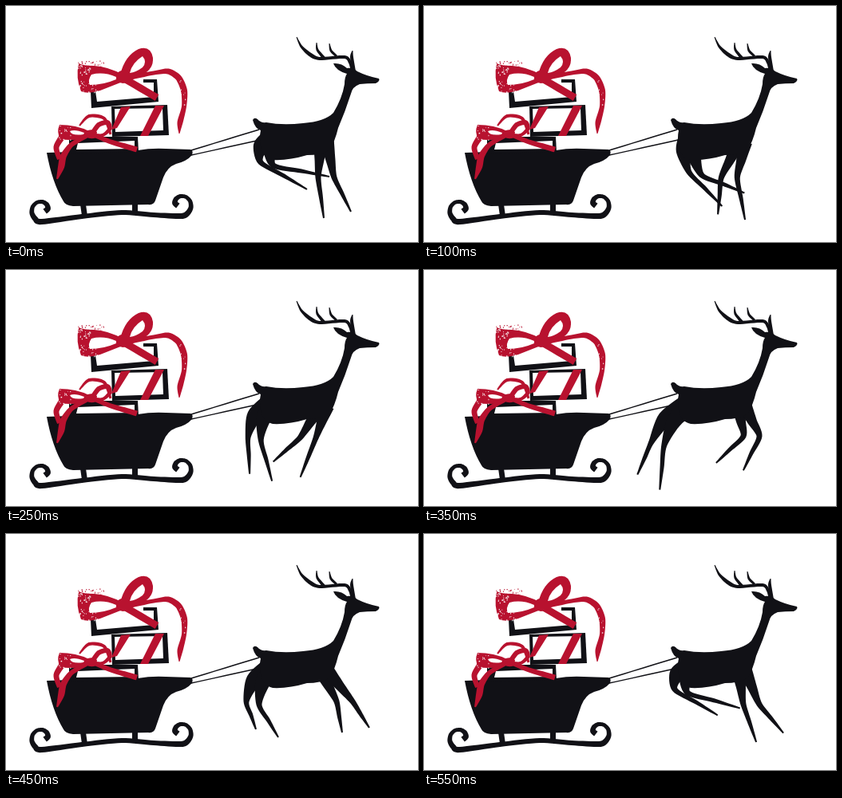
These frames come from a looping animation (516x296 px, 0.6 s). An HTML page with a canvas:

```html
<!DOCTYPE html>
<html lang="en">
<head>
<meta charset="utf-8">
<title>Reindeer and sleigh</title>
<style>
  html, body { margin: 0; width: 100%; height: 100%; overflow: hidden; background: #fff; }
  canvas { display: block; width: 516px; height: 296px; }
</style>
</head>
<body>
<canvas id="stage" width="516" height="296"></canvas>
<script>
const ctx = document.getElementById('stage').getContext('2d');
const INK = '#111116', RED = '#b8122f', PAPER = '#fff';
const LOOP = 600, STEP = 50;

function spline(p0, p1, p2, p3, u, k = 0.4) {
  const u2 = u * u, u3 = u2 * u;
  return p1.map((a, i) => {
    const b = p2[i], m = k * (b - p0[i]), n = k * (p3[i] - a);
    return (2 * u3 - 3 * u2 + 1) * a + (u3 - 2 * u2 + u) * m +
           (3 * u2 - 2 * u3) * b + (u3 - u2) * n;
  });
}

function fill(path, color = INK) {
  ctx.fillStyle = color;
  ctx.fill(new Path2D(path));
}

// Tapered stroke through points of [x, y, width].
function brush(color, ...pts) {
  const line = [], N = 8, last = pts.length - 1;
  for (let i = 0; i < last; i++)
    for (let j = 0; j < N; j++)
      line.push(spline(pts[Math.max(0, i - 1)], pts[i], pts[i + 1],
                       pts[Math.min(last, i + 2)], j / N));
  line.push(pts[last]);
  const left = [], right = [];
  line.forEach(([x, y, w], i) => {
    const a = line[Math.max(0, i - 1)], b = line[Math.min(line.length - 1, i + 1)];
    const dx = b[0] - a[0], dy = b[1] - a[1], s = w / 2 / (Math.hypot(dx, dy) || 1);
    left.push([x - dy * s, y + dx * s]);
    right.unshift([x + dy * s, y - dx * s]);
  });
  ctx.fillStyle = color;
  ctx.beginPath();
  left.concat(right).forEach(p => ctx.lineTo(...p));
  ctx.closePath();
  ctx.fill();
}

function specks(seed, count, color, x, y, w, h) {
  const rnd = () => (seed = (seed * 16807) % 2147483647) / 2147483647;
  ctx.fillStyle = color;
  for (let i = 0; i < count; i++)
    ctx.fillRect(x + rnd() * w, y + rnd() * h, 0.6 + rnd(), 0.6 + rnd());
}

// Spiral from its inner end to its lowest point; side is 1 or -1.
function scroll(cx, cy, side) {
  return Array.from({ length: 9 }, (_, i) => {
    const u = i / 8, a = 0.4 - 5.1 * u, r = 4 + 10.5 * Math.sqrt(u);
    return [cx + side * r * Math.cos(a), cy + r * Math.sin(a), 6 + 1.2 * Math.cos(2 * Math.PI * u)];
  });
}

function drawSleigh() {
  fill('M51 184 L80 183 L165 181 Q182 178 200 179 L231 180 Q235 181 233 187 Q226 195 213 198 Q202 202 197 215 L187 244 Q185 250 178 249 L84 251 Q74 250 72 245 Q58 222 51 184Z');
  fill('M93 249 H100 L102 263 H95Z M158 247 H165 V259 H158Z');
  brush(INK, ...scroll(45, 256, 1), [95, 264, 6], [145, 259, 6], [185, 262, 6],
        ...scroll(219, 249, -1).reverse());
  brush(INK, [232, 181, 1.4], [317, 155, 1.6]);
  brush(INK, [232, 187, 1.3], [318, 168, 1.5]);
}

function drawGifts() {
  // Middle box
  fill('M132 126 L202 124 L204 162 L133 164Z');
  fill('M136 129 L196 128 L197 156 L137 158Z', PAPER);
  fill('M144 127 L156 126 L139 153 L132 155Z M187 125 L198 125 L178 163 L168 163Z', RED);

  // Top box
  fill('M113 106 L172 92 L186 95 V115 L114 121Z', PAPER);
  fill('M106 107 L112 107 L114 120 L185 114 V96 L172 96 V92 L189 92 L191 120 L107 128Z');

  // Bottom box
  fill('M79 168 L108 164 L165 164 L166 183 L79 185Z');
  fill('M90 172 L161 169 L161 179 L88 180Z', PAPER);

  // Large bow
  fill('M146 86 Q128 76 110 75 Q97 75 91 72 Q87 90 94 107 Q103 111 118 106 L146 95Z', RED);
  fill('M138 89 Q122 82 107 86 Q102 93 105 99 Q122 99 138 92Z', PAPER);
  fill('M143 86 Q149 62 166 54 Q181 49 184 65 Q185 79 171 86 Q161 92 148 95Z', RED);
  fill('M155 84 Q158 71 171 63 Q177 70 171 77 Q163 83 155 84Z', PAPER);
  brush(RED, [152, 90, 7], [185, 84, 5], [203, 82, 7], [216, 90, 8],
        [223, 106, 8], [223, 126, 6], [218, 146, 7], [217, 160, 1]);
  brush(RED, [148, 91, 9], [189, 115, 9]);
  fill('M139 84 Q147 77 155 84 L155 94 Q146 100 139 94Z', RED);
  specks(71, 30, PAPER, 89, 72, 16, 14);
  specks(19, 26, PAPER, 92, 94, 22, 14);
  specks(33, 24, RED, 90, 68, 32, 8);
  specks(53, 16, PAPER, 211, 90, 14, 36);

  // Small bow
  fill('M104 157 Q88 149 67 149 Q63 158 68 167 Q88 170 104 164Z', RED);
  fill('M98 159 Q86 154 80 157 Q82 163 97 161Z', PAPER);
  brush(RED, [92, 150, 2], [104, 138, 4], [123, 141, 4], [131, 161, 3]);
  brush(RED, [108, 160, 6], [116, 149, 6], [127, 146, 6], [130, 154, 5], [121, 162, 4], [108, 162, 5]);
  brush(RED, [102, 162, 6], [82, 174, 6], [72, 188, 8], [69, 202, 8], [64, 217, 2]);
  brush(RED, [71, 163, 8], [63, 177, 7], [67, 192, 6]);
  brush(RED, [106, 160, 5], [130, 170, 6], [164, 180, 7]);
  fill('M100 157 Q108 153 114 158 L113 165 Q106 168 100 164Z', RED);
  specks(29, 14, PAPER, 66, 150, 16, 18);
}

function drawDeer() {
  fill('M309 143 Q311 139 315 142 Q319 147 326 146 Q346 150 372 147 Q399 145 410 134 Q421 116 424 98 Q424 89 427 85 Q413 81 410 72 Q420 71 427 78 Q434 77 440 82 Q452 88 467 91 Q469 94 463 97 Q452 97 443 98 Q434 101 432 110 Q425 132 416 153 Q412 170 405 181 Q394 187 377 187 Q354 194 334 193 Q321 190 319 176 Q317 165 319 156 Q312 154 309 143Z');
  brush(INK, [364, 39, 1], [370, 51, 3], [381, 61, 5], [393, 66, 4], [424, 64, 4], [431, 71, 4], [434, 82, 4]);
  brush(INK, [389, 46, 1], [390, 55, 3], [398, 65, 4]);
  brush(INK, [405, 47, 1], [407, 56, 3], [414, 63, 3]);
  brush(INK, [434, 56, 1], [433, 64, 4], [436, 82, 4]);
}

// Periodic motion: a mean plus two harmonics of the stride angle.
const wave = (mean, c1, s1, c2 = 0, s2 = 0) => a =>
  mean + c1 * Math.cos(a) + s1 * Math.sin(a) + c2 * Math.cos(2 * a) + s2 * Math.sin(2 * a);

// Each pair of legs shares one path; spread and lift set its two legs apart.
const HIND = {
  hip: [333, 167], hipGap: 4, widths: [22, 19, 7, 5, 2], bulge: 5,
  knee: [wave(318, 15, 15, -6, -2), wave(209, -8, 0, -3, 4)], kneeGap: [8, 2],
  hoof: [wave(346, 50, 24, -5, -8), wave(247, -21, 1, -4, 4)], spread: 14, lift: wave(0, -8, -5)
};
const FORE = {
  hip: [398, 171], hipGap: 4, widths: [18, 12, 7, 5, 2], bulge: 0,
  knee: [wave(398, 4, -25, -1, 4), wave(212, 3, 2)], kneeGap: [10, 0],
  hoof: [wave(396, 28, -33, -9, -1), wave(254, 7, 7, 1, 2)], spread: 17, lift: wave(2, -6, 5)
};

function drawLegs({ hip, hipGap, widths, bulge, knee, kneeGap, hoof, spread, lift }, a) {
  for (const side of [-1, 1]) {
    const top = [hip[0] + side * hipGap, hip[1]];
    const mid = knee.map((f, i) => f(a) + side * kneeGap[i]);
    const end = [hoof[0](a) + side * spread, hoof[1](a) + side * lift(a)];
    const half = (p, q) => p.map((v, i) => (v + q[i]) / 2);
    const thigh = half(top, mid).map(v => v - bulge);
    brush(INK, ...[top, thigh, mid, half(mid, end), end].map((p, i) => [...p, widths[i]]));
  }
}

let shown = -1;
const start = performance.now();
function frame() {
  const step = Math.floor(((performance.now() - start) % LOOP) / STEP);
  if (step !== shown) {
    shown = step;
    const angle = 2 * Math.PI * step * STEP / LOOP;
    ctx.fillStyle = PAPER;
    ctx.fillRect(0, 0, 516, 296);
    drawSleigh();
    drawGifts();
    drawLegs(HIND, angle);
    drawLegs(FORE, angle);
    drawDeer();
  }
  requestAnimationFrame(frame);
}
frame();
</script>
</body>
</html>
```
